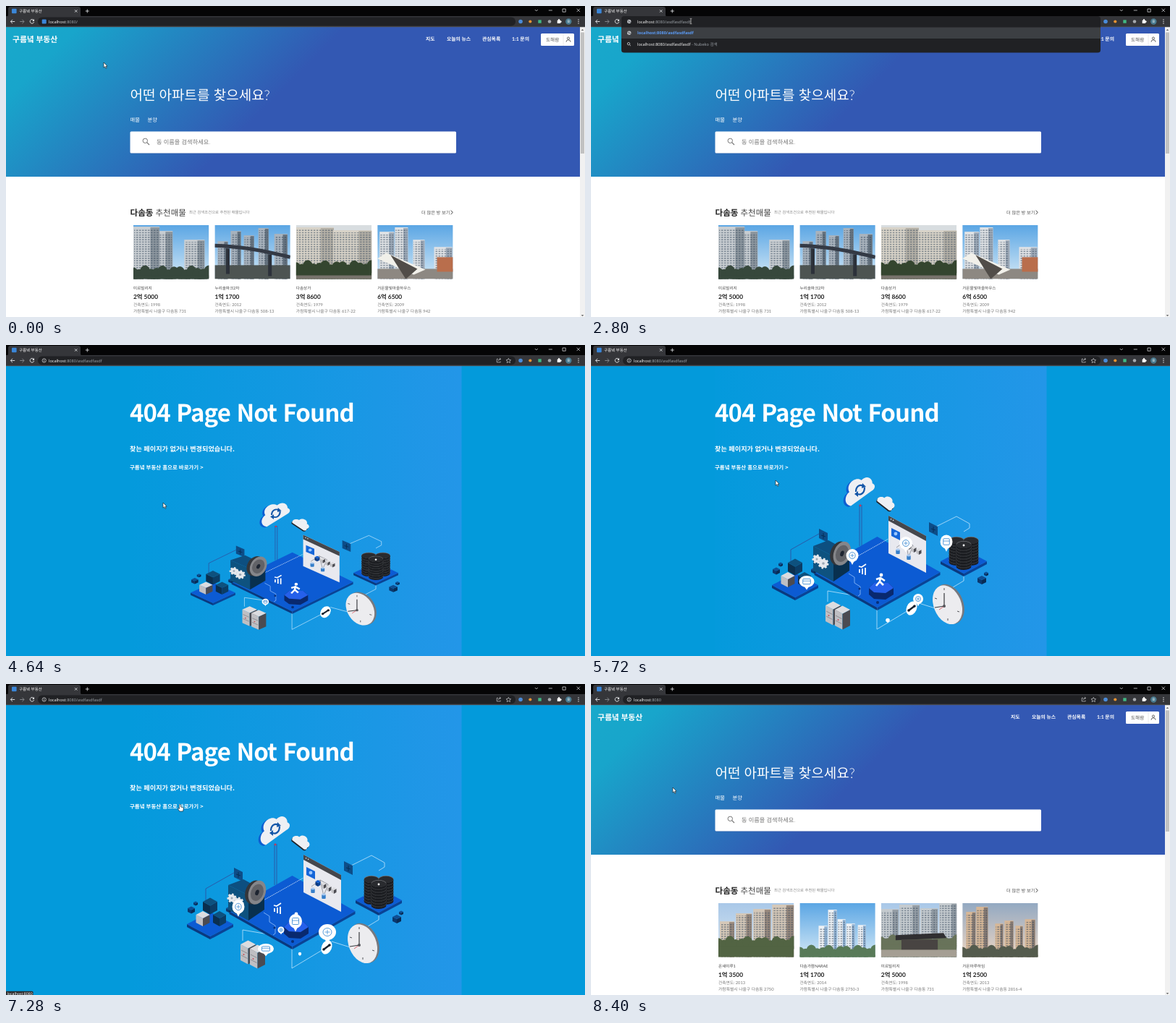
Animation, 800 px wide and 430 px high, one loop 9080 ms. Source, as an HTML page:

```html
<!DOCTYPE html>
<html lang="ko">
<head>
<meta charset="utf-8">
<title>구름녘 부동산</title>
<style>
html, body { margin: 0; width: 100%; height: 100%; overflow: hidden; background: #fff; }
svg { display: block; }
#stage { width: 100vw; height: 100vh; }
text { text-rendering: geometricPrecision; white-space: pre; }
.home, .layout { font-family: Lato, "Noto Sans CJK KR", "Noto Sans CJK", sans-serif; }
.lost { font-family: "Noto Sans CJK KR", "Noto Sans CJK", sans-serif; }
.chrome { font-family: "Noto Sans", "Noto Sans CJK KR", "Noto Sans CJK", sans-serif; }
#headline { letter-spacing: -.055em; }
</style>
</head>
<body>
<svg id="stage" viewBox="0 0 800 430" preserveAspectRatio="none"></svg>
<script>
const LOOP = 9080;
const BRAND = '구름녘 부동산';
const USER = '도해람';
const TYPED = 'asdfasdfasdf';

// Drawing helpers
const rect = (x, y, w, h, fill, rx = 0) =>
  `<rect x="${x}" y="${y}" width="${w}" height="${h}" fill="${fill}" rx="${rx}"/>`;
const dot = (x, y, r, fill, ry = r) => `<ellipse cx="${x}" cy="${y}" rx="${r}" ry="${ry}" fill="${fill}"/>`;
const poly = (points, fill) => `<polygon points="${points}" fill="${fill}"/>`;
const line = (d, stroke = '#fff', width = .7, extra = '') =>
  `<path d="${d}" fill="none" stroke="${stroke}" stroke-width="${width}" ${extra}/>`;
const label = (x, y, size, text, fill = '#fff', weight = 400) =>
  `<text x="${x}" y="${y + size * .36}" font-size="${size}" font-weight="${weight}" fill="${fill}">${text}</text>`;
const group = (id, body, extra = '') => `<g id="${id}" ${extra}>${body}</g>`;
const placed = (transform, body) => `<g transform="${transform}">${body}</g>`;
const isoBox = (x, y, w, h, depth, [top, left, right]) =>
  poly(`${x - w},${y} ${x},${y + h} ${x},${y + h + depth} ${x - w},${y + depth}`, left) +
  poly(`${x + w},${y} ${x},${y + h} ${x},${y + h + depth} ${x + w},${y + depth}`, right) +
  poly(`${x - w},${y} ${x},${y - h} ${x + w},${y} ${x},${y + h}`, top);

const gradient = (id, coords, stops) =>
  `<linearGradient id="${id}" ${coords}>` +
  stops.map(([at, color]) => `<stop offset="${at}" stop-color="${color}"/>`).join('') + '</linearGradient>';
const heroStops = [[0, '#18a9cb'], [.1, '#18a5cb'], [.47, '#3358b3']];
const sky = (id, top, bottom) => gradient(id, 'x2="0" y2="1"', [[0, top], [1, bottom]]);

const defs = `<defs>
  ${gradient('hero', 'gradientUnits="userSpaceOnUse" x1="0" y1="29" x2="500" y2="529"', heroStops)}
  ${gradient('bar', 'gradientUnits="userSpaceOnUse" x1="0" y1="29" x2="417" y2="446"', heroStops)}
  ${gradient('lostBg', '', [[0, '#049adc'], [1, '#2396e8']])}
  ${sky('clear', '#5ba6e4', '#d3e8f6')}${sky('pale', '#a9c8e8', '#dce8f2')}${sky('dusk', '#93a9c2', '#ecd5c2')}
  <pattern id="windows" width="4" height="3.2" patternUnits="userSpaceOnUse">
    <rect width="2.5" height="1.6" fill="#34465a" opacity=".5"/></pattern>
</defs>`;

// Home page
const tower = (x, y, w, light, dark) =>
  rect(x, y, w, 80, light) + rect(x + w * .65, y + 1, w * .35, 80, dark) + rect(x + 1, y + 3, w - 2, 80, 'url(#windows)');
const towers = (list, light, dark) => list.map(([x, y, w]) => tower(x, y, w, light, dark)).join('');
const trees = (y, fill) => Array.from({length: 14}, (_, i) =>
  dot(i * 8, y + 5 + 3 * Math.sin(i * 2.3), 7, fill, 9)).join('') + rect(0, y + 7, 104, 40, fill);

const photosBefore = [
  rect(0, 0, 104, 74, 'url(#clear)') + towers([[70, 20, 28], [26, 8, 28], [0, 2, 36]], '#c9ced2', '#8d979f') + trees(62, '#37483c'),
  rect(0, 0, 104, 74, 'url(#clear)') + towers([[4, 22, 14], [22, 8, 14], [40, 14, 14], [60, 4, 14], [82, 12, 18]], '#a9b3bd', '#66737f') +
    rect(0, 55, 104, 19, '#4d5452') + line('M0 28Q45 29 104 44', '#343a45', 5) + line('M18 32V67M76 40V70', '#2c313a', 5),
  rect(0, 0, 104, 74, '#d8dde0') + towers([[0, 3, 52], [51, 7, 54]], '#d7d2c7', '#b4b0a6') + trees(55, '#34452f') + rect(0, 69, 104, 5, '#77736b'),
  rect(0, 0, 104, 74, 'url(#clear)') + towers([[3, 9, 20], [24, 3, 18], [49, 20, 16], [78, 30, 25]], '#dfe2e5', '#9eaab8') +
    rect(0, 60, 104, 14, '#8d8882') + poly('12,38 66,61 50,68 0,46', '#f1f0ea') + poly('18,41 55,60 39,74', '#514d49') + rect(82, 44, 22, 20, '#b96e4c')
];
const photosAfter = [
  rect(0, 0, 104, 74, 'url(#pale)') + towers([[2, 25, 20], [24, 14, 22], [48, 8, 24], [74, 2, 30]], '#d5c8b8', '#98897d') + trees(52, '#526443'),
  rect(0, 0, 104, 74, 'url(#clear)') + towers([[26, 31, 12], [39, 9, 12], [52, 22, 11], [64, 28, 12], [80, 30, 11]], '#edf1f5', '#8eafd0') + trees(64, '#587a58'),
  rect(0, 0, 104, 74, 'url(#pale)') + towers([[0, 8, 24], [25, 2, 28], [54, 7, 24], [80, 0, 26]], '#c5cbcf', '#949da5') +
    trees(50, '#68735a') + poly('20,44 86,41 90,48 20,51', '#302f31') + rect(28, 50, 50, 15, '#484442') + rect(0, 64, 104, 10, '#a49e93'),
  rect(0, 0, 104, 74, 'url(#dusk)') + towers([[5, 12, 13], [19, 5, 16], [45, 28, 11], [58, 24, 12], [73, 31, 10], [86, 22, 14]], '#d6b797', '#877a72') + trees(64, '#545b4d')
];
const listingsBefore = [
  ['미르빌리지', '2억 5000', 1998, '731'], ['누리솔파크2차', '1억 1700', 2012, '508-13'],
  ['다솜상가', '3억 8600', 1979, '617-22'], ['가온물빛마을하우스', '6억 6500', 2009, '942']];
const listingsAfter = [
  ['온새미루1', '1억 3500', 2013, '2750'], ['다솜가람NARAE', '1억 1700', 2014, '2750-3'],
  ['미르빌리지', '2억 5000', 1998, '731'], ['가온마루하임', '1억 2500', 2013, '2816-4']];
const cardX = i => 176 + i * 112.4;
const pictures = list => list.map((body, i) =>
  `<svg x="${cardX(i)}" y="303" width="104.4" height="74.5" viewBox="0 0 104 74" preserveAspectRatio="none">${body}</svg>`).join('');
const captions = list => list.map(([name, price, year, lot], i) => {
  const x = cardX(i);
  return label(x, 390, 5.6, name, '#444') + label(x, 401.5, 8.4, price, '#222', 700) +
    label(x, 413, 5.7, `건축연도: ${year}`, '#777') + label(x, 422, 5.8, `가람특별시 나울구 다솜동 ${lot}`, '#777');
}).join('');

const person = (x, y) => dot(x, y - 1.7, 1.6, 'none" stroke="#444" stroke-width=".8') + line(`M${x - 3} ${y + 3.5}q0 -3 3 -3t3 3`, '#444', .8);
const nav = (xs, size, weight) => ['지도', '오늘의 뉴스', '관심목록', '1:1 문의']
  .map((name, i) => label(xs[i], 46, size, name, '#fff', weight)).join('');
const userButton = (x, w, size, split) =>
  rect(x, 38, w, 17, '#fff', 1.5) + label(x + 7, 46.3, size, USER, '#555') +
  line(`M${x + split} 38V55`, '#ddd', .6) + person(x + split + 7, 46.3);

const home = rect(0, 29, 800, 401, '#fff') + rect(0, 29, 793, 207, 'url(#hero)') +
  label(9, 46.5, 10.8, BRAND, '#fff', 700) + nav([580, 609, 658, 699], 6.85, 700) + userButton(739, 46, 6.6, 31) +
  label(171.5, 123.5, 19, '어떤 아파트를 찾으세요?', '#fff', 300) +
  label(171.5, 157.5, 7.3, '매물') + label(195.5, 157.5, 7.3, '분양') +
  rect(171.5, 174.3, 450.5, 30, '#24408a55', 1.5) + rect(171.5, 173.5, 450.5, 30, '#fff', 1.5) +
  `<circle cx="192.3" cy="186.3" r="3.2" fill="none" stroke="#777"/>` + line('M194.7 188.7L198 192', '#777', 1.2) +
  label(208, 188.5, 8.2, '동 이름을 검색하세요.', '#777', 300) +
  label(171.5, 285.5, 11.6, '다솜동', '#222', 700) + label(206.5, 285.5, 11.5, '추천매물', '#444', 300) +
  label(253, 285, 5.4, '최근 검색조건으로 추천된 매물입니다', '#888') +
  label(574, 285.3, 6.3, '더 많은 방 보기', '#555') + line('M614.5 282.7l2.8 2.7l-2.8 2.7', '#444', 1) +
  group('before', pictures(photosBefore) + captions(listingsBefore)) +
  group('afterText', captions(listingsAfter)) + group('afterPhotos', pictures(photosAfter)) +
  rect(793, 29, 7, 401, '#f1f1f1') + rect(794, 36.5, 5, 167.5, '#c1c1c1') +
  poly('794.7,34 796.5,32 798.3,34', '#666') + poly('794.7,427 796.5,429 798.3,427', '#666');

// Bare layout shown while loading
const footerLines = [
  [109, `(주)${BRAND}`], [117.3, '대표: 노별찬, 도한솔'],
  [125.7, '사업자 번호: 000-00-00000 통신판매업신고번호 : 제2021-가람 나울-00000호'],
  [134, `주소 : 가람 나울구 물빛나로 300 너울캠퍼스 솔뫼 10층 (주)${BRAND}`],
  [150.8, '고객센터 : 00-0000-0000 (평일 10:00 ~ 18:30 토 일요일, 공휴일 휴무)'],
  [159, '팩스 : 00-000-0000 허위매물 신고 : byeolchan.dev@mail.test']];
const layout = rect(0, 29, 800, 401, '#fff') + rect(0, 29, 800, 34.5, 'url(#bar)') +
  label(9, 46.3, 11.8, BRAND, '#fff', 700) + nav([578, 607.5, 660, 704], 7.4, 500) + userButton(744.5, 47.5, 7.1, 33.5) +
  rect(0, 63, 800, 135, '#333') +
  [[175, '개발팀 소개'], [219.5, '이용약관'], [256.5, '개인정보처리방침'], [317, '매물관리규정']]
    .map(([x, s]) => label(x, 77.5, 6.25, s, '#ddd')).join('') +
  [213, 250, 310].map(x => line(`M${x} 75.5v4`, '#666', .5)).join('') +
  line('M175 92.5H625M597 63V92.5M625 63V92.5', '#454545', .7) +
  poly('607.5,75 611,71 614.5,75', '#ddd') + label(605.2, 82, 5.2, 'TOP', '#ccc') +
  footerLines.map(([y, s]) => label(175, y, 5.55, s, '#999')).join('') +
  rect(175, 169, 46.5, 13.5, '#555', 1) + label(180, 175.8, 6.1, '자주묻는 질문', '#eee') +
  rect(225, 169, 27.5, 13.5, '#555', 1) + label(229.5, 175.8, 6.1, '1:1문의', '#eee') +
  [554, 574.8, 595.7, 616.5].map(x => dot(x, 174, 8.3, '#4d4d4d') + dot(x, 174, 3.6, '#fff')).join('');

// Not-found page illustration
const teal = ['#0e517e', '#0a2f4e', '#0b3d66'];
const blue = ['#0c5bd3', '#0a397f', '#0a4396'];
const grey = ['#dcdcdf', '#bfbfc3', '#4b4b51'];
const navy = ['#0f4f94', '#0b386f', '#082c56'];
const cubes = list => list.map(([x, y, r]) => isoBox(x, y, r, r * .5, r, navy)).join('');
const cloud = color => `<path d="M-20 12C-27 3-18-7-11-7C-9-21 8-22 11-11C21-13 24-3 20 3C23 9 18 13 13 12Z" fill="${color}"/>`;
const chip = (x, y) => poly(`${x - 6},${y - 10} ${x + 6},${y - 4} ${x + 6},${y + 9} ${x - 6},${y + 3}`, '#0d4d88') +
  line(`M${x - 3} ${y - 1}l6 2M${x} ${y - 4}v8`, '#052f58', 1);
const disks = (x, y) => Array.from({length: 8}, (_, i) => {
  const top = y + 28 - i * 4;
  return dot(x, top + 2, 10.5, '#17191d', 5) + dot(x, top, 10.5, '#6d6f73', 5) + dot(x, top + .5, 10.3, '#292b2f', 4.7);
}).join('');
const gear = (x, y, r) => dot(x, y, r, '#e6e9ed') +
  `<circle cx="${x}" cy="${y}" r="${r}" fill="none" stroke="#e6e9ed" stroke-width="3" stroke-dasharray="2.4 2.2"/>` + dot(x, y, r * .3, '#9aa7b5');
const cabinet = (x, y) => isoBox(x, y, 10.5, 5.5, 22, grey) +
  line(`M${x - 9.5} ${y + 8}l8.5 4.5M${x - 9.5} ${y + 15}l8.5 4.5`, '#77777c', .7) + dot(x - 6, y + 14, 1, '#c4515b');

const art =
  line('M276 300V283L315 261M371 221V278M374 221V282', '#324b9b', .8) + dot(372, 222, 1.4, '#c23c5b') +
  line('M473 253L505 237L523 247V253L515 258M515 317V326L480 347M450 356L485 367M395 363V393L440 366M327 355V340L368 347', '#d8efff', .7) +
  isoBox(395.5, 314, 87, 49, 4, blue) +
  line('M354 300L411 268', '#fff', .8, 'stroke-dasharray="1.5 1"') + line('M356 316L364 321V329L372 334V345L369 347', '#a8cdff', .7) +
  isoBox(282, 332, 32, 17, 4, blue) + isoBox(282, 301, 10, 5.5, 12, teal) + isoBox(295, 319, 9, 5, 11, teal) + isoBox(272, 319, 9.5, 5, 11, grey) +
  cubes([[256, 310, 5], [262, 302, 3], [308, 310, 4], [540, 322, 6], [546, 315, 3]]) +
  chip(321, 264) + chip(473, 255) +
  poly('307,278 335,292 335,327 307,312', '#0e527f') + poly('307,278 328,270 350,282 335,292', '#0d4f80') + poly('335,292 357,282 357,312 335,327', '#08304f') +
  placed('rotate(20 346 288)', dot(343, 289, 12, '#34363a', 17) + dot(347, 288, 11.5, '#85868a', 17) + dot(347, 288, 8.5, '#616267', 12) + dot(347, 288, 2.5, '#1d2430', 4)) +
  gear(312, 296, 5) + gear(321, 302, 6) +
  line('M371 315v-5M375 317v-8M379 318v-10M370 306l4 1l6 -4', '#fff', 1.8) +
  poly('384,336 391,329 411,329 418,336 418,345 407,352 391,351 384,345', '#09296f') + poly('384,336 391,329 411,329 418,336 407,343 391,342', '#2560ea') +
  dot(401, 318, 2.4, '#fff') + line('M400 321L399 327L404 332M399 327L394 333M394 324L400 322L406 326', '#fff', 2.7) +
  dot(371, 337, 1.5, '#082e76') + dot(396, 356, 2, '#082e76') +
  poly('411,236 463,264 463,315 411,288', '#e8e9ef') + poly('411,236 463,264 463,271 411,243', '#45474c') +
  line('M414 240.5l1.2 .7M417 242l1.2 .7', '#fff', 1.2) + poly('415,253 427,259 427,270 415,264', '#1566d9') + dot(421, 261, 2.4, '#9bc7ff') +
  line('M422 280L434 271L445 277L440 290M434 271L439 293', '#62666e', .6) +
  [[431, 273], [439, 276], [446, 280], [453, 283]].map(([x, y], i) => isoBox(x, y, 3.5, 2, 5, i ? grey : blue)).join('') +
  [[424, 283], [439, 291]].map(([x, y]) => rect(x - 2.7, y, 5.4, 6, '#367fca', 1) + dot(x, y, 2.7, '#a9c9ef', 1.4)).join('') +
  isoBox(515, 299, 32, 17, 4, blue) + disks(505, 270) + disks(525, 270) + disks(515, 276) + dot(515, 277, 1.4, '#fff') +
  cabinet(334.5, 360) + cabinet(347.5, 366) +
  placed('rotate(-22 493 359)', dot(495, 359, 19.5, '#77797f', 28.5) + dot(492.5, 359, 19, '#ececef', 28)) +
  line('M488 361V343M488 361L475 363', '#3a3b40', 1.2) + line('M488 361L481 366', '#d4434e', .8) + dot(488, 361, 2, '#55565b') +
  line('M488 336v3M509 369l-3 -1M493 381v-3M475 350l3 1', '#55565b', 1) +
  placed('rotate(24 443 364)', dot(443, 364, 7, '#fff', 10)) + line('M439 367L447 361', '#17202d', 2.4) + dot(439, 367, 1.8, '#17202d') + dot(447, 361, 1.8, '#17202d') +
  placed('translate(367 203) rotate(-36) scale(1.06 .88)', cloud('#0e5fd2')) + placed('translate(370 201.5) rotate(-36) scale(1.06 .88)', cloud('#eef0f4')) +
  line('M366 203C366 195 372 192 376 195M378 197C378 205 372 209 367 205', '#1456a8', 2.2) +
  poly('375,191 380,196 374,198', '#1456a8') + poly('369,202 364,206 369,210', '#1456a8') +
  placed('translate(407 219.5) rotate(38) scale(.57 .5)', cloud('#20242b')) + placed('translate(408 218) rotate(38) scale(.57 .5)', cloud('#eef0f4'));

// Pop-up bubbles: x, y, rx, ry, appears, vanishes
const bubbles = [
  [357, 347, 5, 5, 4320, 5000], [361, 291, 8.5, 9, 5320, 6200], [298, 327, 10.5, 8, 5320, 6240],
  [435, 274, 9, 9, 5240, 6280], [491, 272, 8.5, 9.5, 5360, 6320], [452, 351, 7, 7, 5400, 6080],
  [410, 380, 3, 3, 5520, 6000], [321, 308, 8.5, 9.5, 6760, 7680], [400, 328, 9, 10, 6680, 7720],
  [444, 343, 12, 11, 6800, 7800], [359, 366, 11, 7, 6840, 7760], [380, 340, 4.5, 4.5, 6960, 7640],
  [406, 373, 2.2, 2.2, 7000, 7560]];
const bubble = ([, , rx, ry], i) => group('bubble' + i,
  poly(`${-rx * .4},${ry * .7} 0,${ry * 1.45} ${rx * .4},${ry * .7}`, '#fff') + dot(0, 0, rx, '#fff', ry) +
  (rx < 4 ? '' : i % 2
    ? dot(0, 0, rx * .5, 'none" stroke="#2c82d0" stroke-width=".8', ry * .5) + line(`M${-rx * .3} 0H${rx * .3}M0 ${-ry * .3}V${ry * .3}`, '#2c82d0', .7)
    : rect(-rx * .5, -ry * .45, rx, ry * .9, 'none" stroke="#2c82d0" stroke-width=".8', 1) + line(`M${-rx * .5} ${-ry * .1}H${rx * .5}`, '#2c82d0', .7)));

const lost = rect(0, 29, 800, 401, '#039adb') + rect(171, 29, 458.5, 401, 'url(#lostBg)') +
  group('headline', label(171, 94, 33, '404 Page Not Found', '#fff', 700)) +
  label(171, 144, 9.15, '찾는 페이지가 없거나 변경되었습니다.', '#fff', 700) +
  label(171, 169, 7.45, `${BRAND} 홈으로 바로가기 &gt;`, '#fff', 700) +
  group('art', art + bubbles.map(bubble).join(''));

// Browser frame
const icon = '#e8eaed';
const chromeBar = rect(0, 0, 800, 15, '#050506') + `<path d="M1 14.5Q3 14.5 3 12V4Q3 1 6 1H100Q103 1 103 4V12Q103 14.5 105 14.5Z" fill="#35363a"/>` +
  rect(0, 14, 800, 15, '#35363a') + rect(0, 28.5, 800, .7, '#54565a') + rect(44, 15.5, 660, 12, '#202124', 6) +
  group('favicon', rect(8, 3.7, 6.6, 6.6, '#3b86d8', 1)) +
  group('spinner', line('M11.3 3.6A3.4 3.4 0 1 1 7.9 7', '#4a90e2', 1.1)) +
  label(18, 7, 5.5, BRAND) + line('M95 5.3l3.4 3.4M98.4 5.3l-3.4 3.4M109.8 7h5M112.3 4.5v5', icon, .8) +
  line('M730.8 5l2 2l2 -2M749.8 6h5M769 4h4.2v4.2h-4.2zM788.6 3.7l4.4 4.4M793 3.7l-4.4 4.4', icon, .7) +
  line('M12.2 21.5H6.5M9 18.8l-2.7 2.7l2.7 2.7', icon, .9) + line('M19.2 21.5h5.7M22.4 18.8l2.7 2.7l-2.7 2.7', '#8b8d91', .9) +
  group('reload', line('M38.2 19.6A2.8 2.8 0 1 0 38.7 22', icon, .9) + poly('39,18 39,21 36.2,21', icon)) +
  group('stop', line('M33.6 19.2l4.6 4.6M38.2 19.2l-4.6 4.6', icon, .9)) +
  group('tools', line('M680 19.3h-1.8v4.6h5v-1.2M680 22q.4 -2.6 3.3 -2.6M682 17.9l1.6 1.5l-1.6 1.5', icon, .6) +
    line('M694.3 18.4l1 2.1l2.3 .3l-1.7 1.5l.5 2.3l-2.1 -1.2l-2.1 1.2l.5 -2.3l-1.7 -1.5l2.3 -.3z', icon, .6)) +
  dot(711, 21.5, 2.8, '#4a8bd9') + dot(724.3, 21.5, 2.1, '#e89332') +
  `<rect id="devtool" x="735.3" y="19.3" width="4.4" height="4.4"/>` + dot(751, 21.5, 2.3, '#a6a9ad') +
  rect(761.7, 19.5, 4.5, 4.5, '#fff', .6) + dot(764, 19, 1.1, '#fff') + dot(766.6, 21.7, 1.1, '#fff') +
  dot(777.3, 21.5, 4.2, '#4a7c92') + label(775.7, 21.4, 5, 'B') + [19, 21.5, 24].map(y => dot(791, y, .7, icon)).join('');

const globe = y => dot(52.7, y, 2.7, '#c3c6ca') + line(`M50.5 ${y - .8}h2.2l1 1.6h1.5M51.5 ${y + 2}l1 -1.6`, '#33363a', .7);
const dropdown = `<path d="M42 18Q42 14 46 14H700Q704 14 704 18V61Q704 64.5 700 64.5H46Q42 64.5 42 61Z" fill="#202124"/>` +
  rect(42, 29.5, 662, 15.5, '#3c3f43') + globe(37.2) +
  `<circle cx="52" cy="52.2" r="1.7" fill="none" stroke="${icon}" stroke-width=".7"/>` + line('M53.3 53.5l1.7 1.7', icon, .7) +
  `<text x="64" y="39.2" font-size="5.6" font-weight="600" fill="#5b9bf5">localhost:8080/<tspan class="typed"></tspan></text>` +
  `<text x="64" y="55.2" font-size="5.6" fill="#f1f1f1">localhost:8080/<tspan class="typed"></tspan><tspan fill="#9aa0a6"> - Nubeko 검색</tspan></text>`;
const address = group('siteIcon', rect(49.7, 18.5, 6, 6, '#3b86d8', 1)) + group('globe', globe(21.5)) +
  group('info', `<circle cx="52.7" cy="21.5" r="2.6" fill="none" stroke="${icon}" stroke-width=".7"/>` + line('M52.7 21.1v1.8M52.7 19.8v.7', icon, .7)) +
  `<text id="url" x="59" y="23.5" font-size="5.6" fill="#f1f1f1">localhost<tspan id="path" fill="#9aa0a6"></tspan></text>` + group('caret', rect(0, 18, .7, 7, '#fff'));
const status = rect(-2, 424.8, 39.5, 8, '#292a2d', 1.5) + label(1.5, 428.3, 5.2, 'localhost:8080');

const pointer = group('arrow', '<path d="M0 0V7.2L1.7 5.7L2.9 8.3L4.1 7.7L2.9 5.2H5.1Z" fill="#fff" stroke="#111" stroke-width=".6"/>') +
  group('beam', line('M-1.5 -3.7h3M0 -3.7v7.4M-1.5 3.7h3', '#111', 1.3) + line('M-1.5 -3.7h3M0 -3.7v7.4M-1.5 3.7h3', '#ddd', .6)) +
  group('hand', '<path d="M-1 0Q0 -1 1 0V3L4 3.8Q5 4.2 4.7 6L4 9H-.7L-3 5.6Q-2.5 4.3 -1 5.5Z" fill="#fff" stroke="#111" stroke-width=".6"/>');

const stage = document.getElementById('stage');
stage.innerHTML = defs + group('home', home, 'class="home"') + group('layout', layout, 'class="layout"') +
  group('lost', lost, 'class="lost"') + group('chrome', chromeBar + group('dropdown', dropdown) + address + group('status', status), 'class="chrome"') +
  group('pointer', pointer);

// Motion
const $ = id => document.getElementById(id);
const show = (id, on) => { $(id).style.display = on ? '' : 'none'; };
const between = (t, from, to) => t >= from && t < to;
const clamp = v => Math.max(0, Math.min(1, v));
const smooth = v => v * v * (3 - 2 * v);

function track(t, keys, ease = v => v) {
  const next = keys.findIndex(key => key[0] > t);
  if (next === 0) return keys[0].slice(1);
  if (next < 0) return keys[keys.length - 1].slice(1);
  const a = keys[next - 1], b = keys[next];
  const k = ease((t - a[0]) / (b[0] - a[0]));
  return a.slice(1).map((v, i) => v + (b[i + 1] - v) * k);
}

const pointerKeys = [[40, 135, 78], [600, 138, 21], [4000, 138, 21], [4240, 173, 166], [4640, 217, 218],
  [5240, 252, 216], [5720, 255, 187], [6120, 240.5, 167], [7640, 240.5, 167], [8400, 113, 143]];
const scaleKeys = [[4040, .9, .6], [4640, .966, .833], [4960, 1.015, 1.02], [5160, 1, 1]];

function render(t) {
  const onLost = between(t, 4040, 7600), onLayout = between(t, 3680, 4040);
  const loading = between(t, 3360, 4080), editing = t < 3360;
  show('home', !onLost && !onLayout);
  show('layout', onLayout);
  show('lost', onLost);
  show('before', t < 3680);
  show('afterText', t >= 7960);
  show('afterPhotos', t >= 8080);

  show('favicon', !loading);
  show('spinner', loading);
  $('spinner').setAttribute('transform', `rotate(${(t - 3880) * .36} 11.3 7)`);
  show('reload', !loading);
  show('stop', loading);
  show('tools', !editing);
  $('devtool').setAttribute('fill', onLayout ? '#8d9094' : '#41b883');

  const typed = t < 2040 ? '' : TYPED.slice(0, Math.floor((t - 2040) / 69) + 1);
  show('dropdown', between(t, 2040, 3360));
  document.querySelectorAll('.typed').forEach(node => { node.textContent = typed; });
  show('siteIcon', t < 2040);
  show('globe', between(t, 2040, 3360));
  show('info', !editing);
  const urlX = between(t, 880, 3360) ? 64 : 59;
  $('url').setAttribute('x', urlX);
  $('path').textContent = t < 7600 ? ':8080/' + typed : ':8080';
  show('caret', between(t, 1640, 3200));
  $('caret').setAttribute('transform', `translate(${urlX + $('url').getComputedTextLength()} 0)`);

  const [x, y] = track(t, pointerKeys, smooth);
  const hovering = between(t, 6120, 7680);
  $('pointer').setAttribute('transform', `translate(${x} ${y})`);
  show('beam', y < 28);
  show('hand', hovering);
  show('arrow', y >= 28 && !hovering);
  show('status', hovering);

  const [sx, sy] = track(t, scaleKeys);
  $('art').setAttribute('transform', `translate(398 395) scale(${sx} ${sy}) translate(-398 -395)`);
  bubbles.forEach(([bx, by, , , from, to], i) => {
    const size = smooth(clamp((t - from) / 240)) * smooth(clamp((to - t) / 200));
    show('bubble' + i, size > 0);
    $('bubble' + i).setAttribute('transform', `translate(${bx} ${by + 8 * (1 - size)}) scale(${size})`);
  });
}

const start = performance.now();
function tick() {
  const t = (performance.now() - start) % LOOP;
  render(Math.floor(t / 40) * 40);
  requestAnimationFrame(tick);
}
tick();
</script>
</body>
</html>
```
